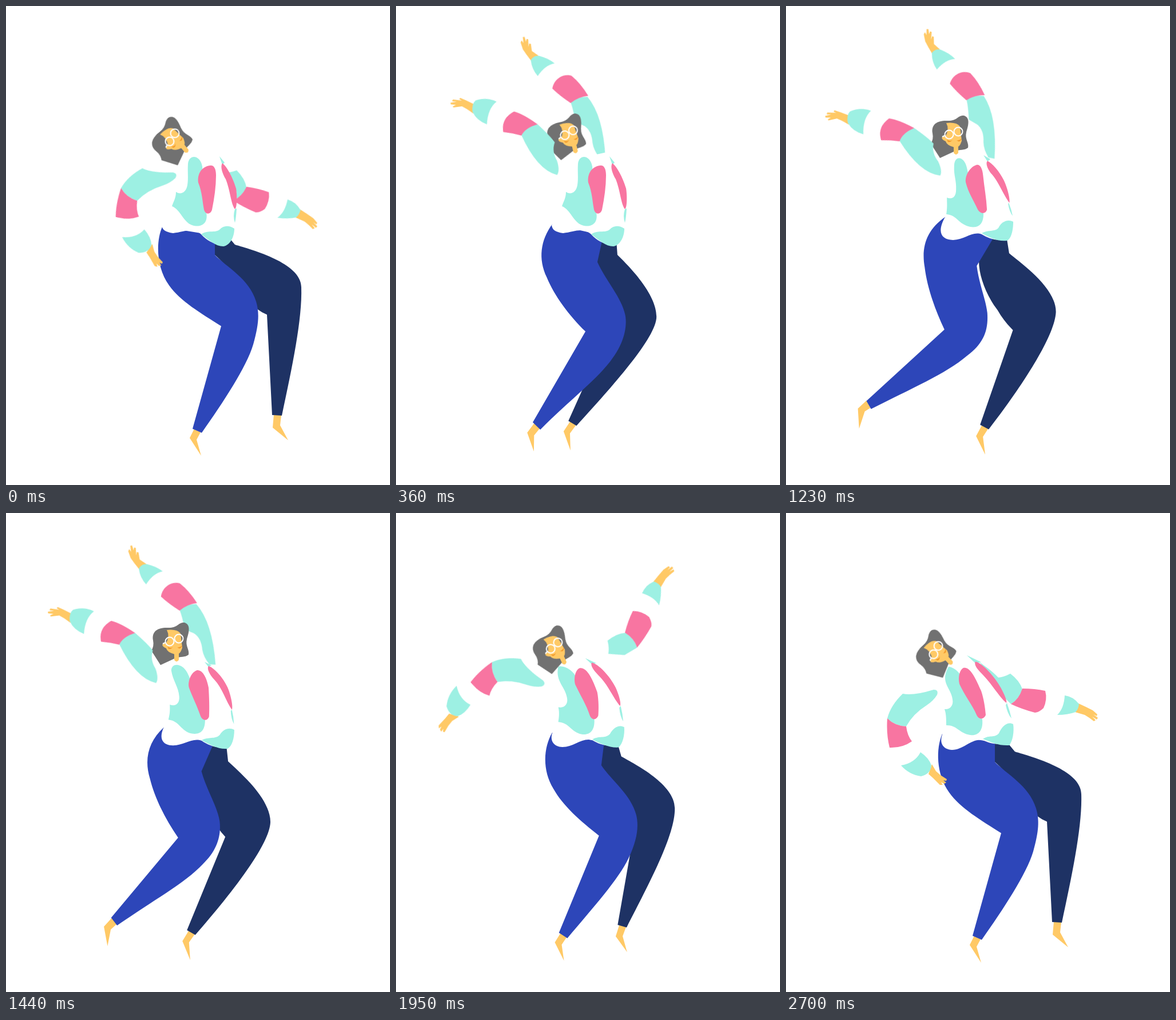
Recreate the animation shown at these times as an HTML page without scripts. Size 671 by 835 pixels, loop 4.5 s.

```html
<!DOCTYPE html>
<html lang="en">
<head>
<meta charset="utf-8">
<title>Dancer</title>
<style>
html, body { margin: 0; width: 100%; height: 100%; overflow: hidden; background: #fff; }
svg { display: block; width: 100%; height: 100%; }
svg * { animation: 4.5s cubic-bezier(.37,0,.63,1) infinite; }

.mint { fill: #9df0e3; }
.pink { fill: #f875a1; }
.skin { fill: #ffc966; }
.hair { fill: #717171; }
.blush { fill: #f39a2b; }
.white { fill: #fff; }
.blue { fill: #2d46b9; }
.navy { fill: #1e3264; }
.glasses { fill: none; stroke: #fff; stroke-width: 2; }

/* arms swap between the raised and lowered drawing mid-swing */
.up { animation-name: up; animation-timing-function: step-end; }
.down { animation-name: down; animation-timing-function: step-end; }
@keyframes up { 0%, 43%, to { visibility: hidden } 4.8% { visibility: visible } }
@keyframes down { 0%, 43%, to { visibility: visible } 4.8% { visibility: hidden } }

#rightUp { animation-name: rightUp; transform-origin: 352px 252px; }
@keyframes rightUp {
  0% { transform: translate(0,0) rotate(162deg) }
  9.6%, 38% { transform: translate(0,0) rotate(0deg) }
  22.2%, 26.4% { transform: translate(0,0) rotate(17.4deg) }
  48%, to { transform: translate(-14px,14px) rotate(148deg) }
}
#rightDown { animation-name: rightDown; transform-origin: 345px 270px; }
@keyframes rightDown {
  0% { transform: translate(13px,0) rotate(8deg) }
  9.6%, 38% { transform: translate(0,-10px) rotate(-158deg) }
  48% { transform: translate(6px,0) rotate(-10deg) }
  60%, to { transform: translate(0,0) rotate(0deg) }
}
#leftUp { animation-name: leftUp; transform-origin: 250px 280px; }
@keyframes leftUp {
  0% { transform: translate(26px,-2px) rotate(-80deg) }
  9.6% { transform: translate(26px,-2px) rotate(0deg) }
  24.9%, 26.4% { transform: translate(12px,0) rotate(-13deg) }
  38% { transform: translate(0,0) rotate(0deg) }
  48%, to { transform: translate(12px,32px) rotate(-80deg) }
}
#leftUpFore { animation-name: leftUpFore; transform-origin: 165px 180px; }
@keyframes leftUpFore {
  0%, 48%, to { transform: rotate(-40deg) }
  9.6%, 38% { transform: rotate(0deg) }
}
#leftDown { animation-name: leftDown; transform-origin: 262px 312px; }
@keyframes leftDown {
  0% { transform: translate(33px,-17px) rotate(15deg) }
  9.6% { transform: translate(0,-45px) rotate(101deg) }
  38% { transform: translate(-12px,-32px) rotate(116deg) }
  48%, 60%, to { transform: translate(0,0) rotate(0deg) }
  54% { transform: translate(0,0) rotate(5deg) }
}
#leftDownFore { animation-name: leftDownFore; transform-origin: 198px 390px; }
@keyframes leftDownFore {
  0%, 48%, 60%, to { transform: rotate(0deg) }
  9.6%, 38% { transform: rotate(82deg) }
  54% { transform: rotate(45deg) }
}
#head { animation-name: head; transform-origin: 295px 221.5px; }
@keyframes head {
  0% { transform: translate(-4.5px,7.5px) rotate(-40deg) }
  9.6% { transform: translate(8px,-1px) rotate(-11deg) }
  24.9%, 26.4% { transform: translate(-2px,0) rotate(0deg) }
  38% { transform: translate(0,0) rotate(0deg) }
  48%, to { transform: translate(-33px,17.5px) rotate(-43deg) }
}

#backLeg { animation-name: backLeg; }
@keyframes backLeg {
  0%, 48%, to { d: path("M365,400L390,404L400,416C430,425 516,448 516,490C518,545 500,630 482,714L465,713L456,538Q448,535 440,529C420,500 385,450 365,434Z") }
  9.6%, 38% { d: path("M355,400L384,400L386,435C405,455 451,505 451,545C451,580 370,665 304,733L290,724L368,564Q358,552 355,542C347,510 340,470 338,445Z") }
  22.2%, 26.4% { d: path("M355,395L385,400L390,431C410,448 472,490 472,533C470,580 400,680 355,738L340,730L397,565Q380,548 370,530C350,505 337,470 337,445Z") }
}
#frontLeg { animation-name: frontLeg; }
@keyframes frontLeg {
  0%, 48%, to { d: path("M273,385C262,410 262,455 285,487C305,515 340,535 376,558L326,737L342,744C380,690 420,630 432,590C442,555 443,535 437,515C425,475 385,455 365,434L365,400Z") }
  9.6%, 38% { d: path("M273,380C252,408 247,440 262,472C275,505 300,540 328,568L233,725L246,738C300,685 350,650 375,615C395,590 402,560 398,540C392,510 365,480 351,447L362,400Z") }
  22.2%, 26.4% { d: path("M279,367C245,390 236,420 242,455C246,490 260,530 276,564L139,688L147,702C215,668 280,640 315,610C345,588 353,565 351,535C348,510 337,485 333,453L365,400Z") }
}
#backFoot { animation-name: backFoot; }
@keyframes backFoot {
  0%, 48%, to { d: path("M468,712L481,713L479,731L493,757L466,735Z") }
  9.6%, 38% { d: path("M293,725L303,732L292,746L292,776L281,742Z") }
  22.2%, 26.4% { d: path("M343,731L354,737L345,751L349,782L333,750Z") }
}
#frontFoot { animation-name: frontFoot; }
@keyframes frontFoot {
  0%, 48%, to { d: path("M329,737L340,743L333,756L341,784L321,753Z") }
  9.6%, 38% { d: path("M236,726L245,736L235,748L234,776L223,743Z") }
  22.2%, 26.4% { d: path("M139,687L146,700L136,706L126,736L124,701Z") }
}

#body { animation-name: body; }
@keyframes body {
  0%, 9.6% { d: path("M300,270L372,254L403,325L400,388C395,425 360,420 341,398C325,385 312,394 292,396C278,394 273,390 272,382L290,349Z") }
  24.9%, 26.4% { d: path("M280,270L343,258L390,335L397,376C395,415 365,412 342,398C325,392 312,408 292,408C272,408 262,395 279,366L280,345Z") }
  38% { d: path("M275,270L355,262L401,330L401,378C398,418 365,414 342,396C325,390 312,402 292,402C277,402 270,392 273,380L288,355Z") }
  48%, to { d: path("M262,290L320,250L386,330L397,368C397,410 365,406 344,396C325,392 310,413 290,413C275,412 269,402 272,390L280,360Z") }
}
#chest { animation-name: chest; }
@keyframes chest {
  0%, 9.6% { d: path("M318,275C320,257 340,260 343,280C345,300 340,330 350,360C354,380 340,387 325,382C310,377 305,355 290,349C293,340 297,335 297,324C305,330 315,325 317,312C319,300 317,290 318,275Z") }
  24.9%, 26.4% { d: path("M294,280C294,258 312,262 316,282C320,300 325,330 345,362C345,382 335,387 322,385C300,380 300,365 280,363C282,350 281,345 281,334C290,338 297,333 297,320C298,305 293,295 294,280Z") }
  38% { d: path("M283,268C285,262 305,262 318,275C330,285 340,330 351,360C351,380 342,386 328,384C310,380 308,360 288,357C291,350 293,345 292,334C302,338 311,332 309,320C305,300 290,290 283,268Z") }
  48%, to { d: path("M284,268C290,268 302,275 306,285C312,300 330,335 343,360C345,380 335,389 322,387C302,384 300,370 280,370C280,360 280,350 277,342C287,343 293,335 291,325C289,305 268,296 284,268Z") }
}
#patch { animation-name: patch; }
@keyframes patch {
  0%, 9.6% { d: path("M357,278C340,280 334,295 336,308C343,325 343,340 346,355C349,365 358,363 360,355C364,335 367,315 367,295C367,283 363,277 357,278Z") }
  24.9%, 26.4% { d: path("M333,277C322,280 312,295 314,308C318,325 328,340 335,355C340,363 349,363 351,355C350,335 346,315 344,295C343,283 339,276 333,277Z") }
  38% { d: path("M334,271C326,274 323,290 326,300C335,318 342,335 345,352C347,363 356,363 359,355C362,345 365,330 365,315C360,295 350,270 334,271Z") }
  48%, to { d: path("M310,270C304,273 300,285 303,298C312,318 326,335 333,352C337,361 346,360 349,352C348,340 346,325 341,310C332,290 322,267 310,270Z") }
}
#strip { animation-name: strip; }
@keyframes strip {
  0%, 9.6% { d: path("M378,274C374,280 378,292 384,302C392,322 393,345 400,354C404,352 404,330 402,318C396,298 386,280 378,274Z") }
  24.9%, 26.4% { d: path("M352,270C348,274 352,285 360,294C372,308 380,330 390,343C392,338 387,318 381,305C373,288 360,274 352,270Z") }
  38% { d: path("M356,263C353,268 360,278 368,286C384,300 390,328 400,343C403,338 399,315 394,303C386,284 366,264 356,263Z") }
  48%, to { d: path("M331,259C328,264 334,272 342,280C360,298 372,320 385,331C387,328 381,315 375,304C365,286 344,262 331,259Z") }
}
#tip { animation-name: tip; }
@keyframes tip {
  0%, 9.6% { d: path("M373,262L382,273L378,277Z") }
  24.9%, 26.4% { d: path("M345,260L357,267L352,271Z") }
  38% { d: path("M349,259L361,264L356,266Z") }
  48%, to { d: path("M316,248L341,260L331,262Z") }
}
#sliver { animation-name: sliver; }
@keyframes sliver {
  0%, 9.6% { d: path("M403,353Q402,370 400,378Q396,366 400,354Z") }
  24.9%, 26.4% { d: path("M389,343Q394,355 396,366Q390,358 388,345Z") }
  38% { d: path("M401,343Q402,355 401,370Q397,360 398,345Z") }
  48%, to { d: path("M386,331Q391,345 394,358Q387,350 384,335Z") }
}
#hem { animation-name: hem; }
@keyframes hem {
  0%, 9.6% { d: path("M341,398C352,390 365,396 373,390C380,382 390,382 399,388C399,402 392,417 380,419C366,419 355,408 341,398Z") }
  24.9%, 26.4% { d: path("M342,396C352,390 365,394 371,387C377,375 388,371 397,376C397,390 394,406 386,409C370,411 355,403 342,396Z") }
  38% { d: path("M342,396C355,389 366,396 376,387C384,377 392,376 401,380C401,395 396,408 388,413C372,414 355,404 342,396Z") }
  48%, to { d: path("M344,394C355,386 364,393 372,384C378,370 388,363 397,368C399,382 396,398 390,405C372,406 360,400 344,394Z") }
}

#shoulder { animation-name: shoulder, late; animation-timing-function: ease-in-out, step-end; }
@keyframes shoulder {
  0%, 48% { d: path("M326,253C350,244 355,270 385,278L415,300L385,315Z") }
  60%, to { d: path("M338,260C345,265 360,275 372,288L393,300L385,320Z") }
}
@keyframes late { 0% { visibility: hidden } 46.5%, to { visibility: visible } }
#flick { animation-name: flick; animation-timing-function: step-end; }
@keyframes flick { 0%, 49%, to { visibility: hidden } 47.3% { visibility: visible } }
</style>
</head>
<body>
<svg viewBox="0 0 671 835">
  <g class="up"><g id="rightUp">
    <path class="mint" d="M318,163Q351,190 368,262L357,263Q345,252 341,240Q336,220 322,214L305,210Q298,190 291,178Q302,165 318,163Z"/>
    <path class="pink" d="M255,160C255,140 272,130 284,132Q302,142 319,161Q302,166 291,179Q270,170 255,160Z"/>
    <path class="skin" d="M221,108L208,102L204,90L201,90L201,96L198,83L195,83L195,88L191,80L188,81L191,91L187,87L186,91L192,102L200,110L211,120Z"/>
    <path class="mint" d="M209,118Q213,108 222,108Q238,109 251,116Q235,122 226,143Q214,134 209,118Z"/>
  </g></g>
  <path id="shoulder" class="mint"/>
  <g class="down"><g id="rightDown">
    <path class="mint" d="M370,287Q381,286 392,280Q408,292 413,307Q407,325 393,333L375,315Z"/>
    <path class="pink" d="M413,306Q435,306 453,310Q457,325 450,340Q443,347 435,348Q412,342 393,333Q407,325 413,306Z"/>
    <path class="skin" d="M511,332L524,338L536,344L544,351L543,354L537,351L545,357L543,360L535,355L541,361L538,363L530,357L522,352L505,347Z"/>
    <path class="mint" d="M487,318Q502,320 512,333Q511,342 506,347Q492,352 474,352Q486,340 487,318Z"/>
  </g></g>

  <path id="backFoot" class="skin"/>
  <path id="backLeg" class="navy"/>
  <path id="frontFoot" class="skin"/>
  <path id="frontLeg" class="blue"/>

  <path id="body" class="white"/>
  <path id="chest" class="mint"/>
  <path id="patch" class="pink"/>
  <path id="tip" class="mint"/>
  <path id="strip" class="pink"/>
  <path id="sliver" class="mint"/>
  <path id="hem" class="mint"/>

  <g id="head">
    <path class="hair" d="M258,222C255,205 268,199 285,200C302,200 302,190 313,191C325,195 320,210 317,220C314,232 322,238 320,247C314,252 305,250 297,253L271,265L255,240Q260,232 258,222Z"/>
    <path class="skin" d="M282,204Q300,202 306,210L309,235Q306,244 303,245L303,256Q299,262 295,256L295,246Q283,243 281,236Q272,232 275,228Q277,225 280,228Q288,215 282,204Z"/>
    <path class="blush" d="M283,233q7,4 10,0q-3,5 -8,4zM300,234q5,1 9,-3q-2,6 -6,5z"/>
    <g class="glasses">
      <circle cx="287" cy="224" r="7.5"/>
      <circle cx="303" cy="219" r="7.5"/>
      <path d="M279,226L275,228"/>
    </g>
  </g>

  <g id="flick" class="pink">
    <path d="M213,367L254,391" stroke="#f875a1" stroke-width="10" stroke-linecap="round"/>
    <ellipse cx="243" cy="419" rx="6" ry="5"/>
  </g>
  <g class="down"><g id="leftDown">
    <path class="mint" d="M204,315Q222,319 258,308Q267,308 264,317Q258,327 246,335Q222,350 210,372Q190,371 177,358Q183,335 204,315Z"/>
    <path class="pink" d="M177,358Q190,371 210,372Q212,388 220,398Q203,410 181,409Q175,385 177,358Z"/>
    <g id="leftDownFore">
      <path class="skin" d="M255,438L262,450L270,457L281,464L280,467L275,466L280,470L276,472L271,469L274,474L269,474L257,462L249,455Z"/>
      <path class="mint" d="M235,417Q250,427 254,440Q253,455 236,459Q215,456 201,440Q225,436 235,417Z"/>
    </g>
  </g></g>
  <g class="up"><g id="leftUp">
    <path class="mint" d="M198,222Q210,206 228,206Q248,228 255,240Q248,255 256,272Q260,290 254,297Q220,285 198,222Z"/>
    <path class="pink" d="M189,180Q205,186 228,206Q206,210 198,223Q182,217 167,214Q165,190 189,180Z"/>
    <g id="leftUpFore">
      <path class="skin" d="M121,159L109,151L99,145L97,147L101,150L86,146L84,149L92,151L81,151L81,154L90,156L84,158L85,160L100,160L108,166L118,175Z"/>
      <path class="mint" d="M117,172Q117,158 125,153Q145,149 161,160Q144,170 139,197Q122,188 117,172Z"/>
    </g>
  </g></g>
</svg>
</body>
</html>
```
